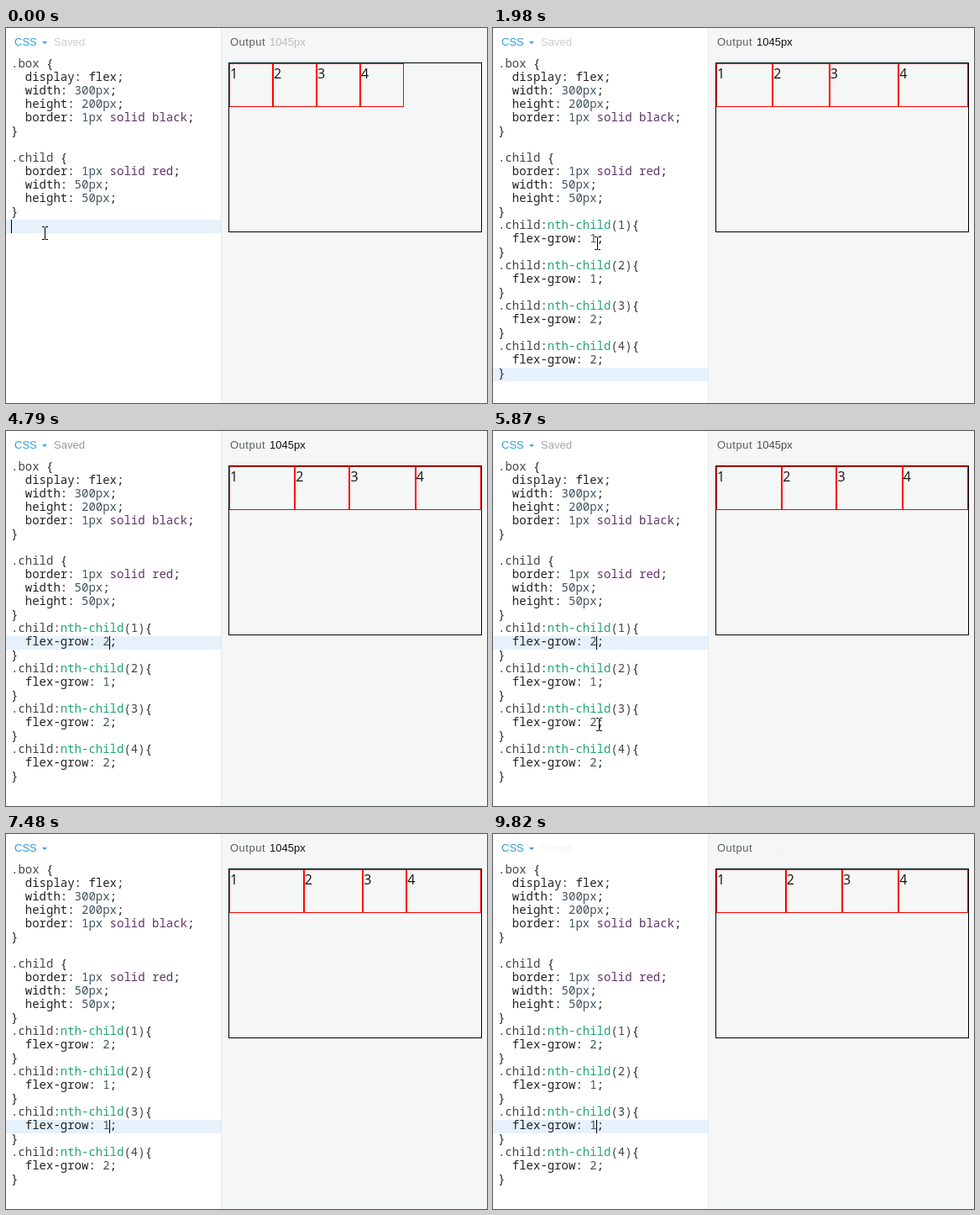
Recreate the animation shown at these times as an HTML page. Size 573 by 446 pixels, loop 9890 ms.

```html
<!DOCTYPE html>
<html lang="en">
<head>
<meta charset="utf-8">
<title>Flex grow demo</title>
<style>
  html, body { margin: 0; width: 100%; height: 100%; overflow: hidden; background: #fff; }
  body { position: relative; font: 13px/16px "Liberation Sans", Arial, sans-serif; }
  body > * { position: absolute; white-space: pre; }
  #output { left: 256px; top: 0; right: 0; bottom: 0; background: #f5f7f6; border-left: 1px solid #e6e9e9; }
  .label { top: 9px; }
  #lang { left: 10px; color: #2f9fd8; }
  #arrow { left: 43px; top: 16px; border: 3px solid transparent; border-top-color: #2f9fd8; }
  #saved { left: 57px; color: #999; }
  #title { left: 267px; letter-spacing: .5px; color: #56605e; }
  #size { left: 314px; color: #111; }
  #active { left: 0; width: 256px; height: 16px; background: #e6f1fc; }
  #code { left: 6px; top: 34px; margin: 0; font: 300 14px/16px "Noto Sans Mono", monospace; color: #222; }
  .selector { color: #444; }
  .pseudo { color: #22a376; }
  .number { color: #40545e; }
  .atom { color: #5f3468; }
  #caret { width: 1px; height: 16px; background: #000; }
  #box { left: 265px; top: 41px; width: 300px; height: 200px; display: flex; border: 1px solid #000; }
  #box div { width: 50px; height: 50px; border: 1px solid #f00; font: 16px/22px "Open Sans", sans-serif; color: #111; }
  svg { left: 0; top: 0; }
</style>
</head>
<body>
<div id="output"></div>
<div class="label" id="lang">CSS</div>
<div id="arrow"></div>
<div class="label" id="saved">Saved</div>
<div class="label" id="title">Output</div>
<div class="label" id="size">1045px</div>
<div id="active"></div>
<pre id="code"></pre>
<div id="caret"></div>
<div id="box"><div>1</div><div>2</div><div>3</div><div>4</div></div>
<svg width="573" height="446">
  <path id="beam" d="M-3.5-7.5h2.5l1 1 1-1h2.5M0-6.5v14M-3.5 7.5h2.5l1-1 1 1h2.5" fill="none" stroke="#000"/>
  <path id="pointer" d="M.5.5v15l3.5-3 2.5 5.5 2-1-2.5-5.5h5z" fill="#fff" stroke="#000"/>
</svg>
<script>
const LOOP = 9890, BLINK = 530;
const LAST_TYPED = -2320, PASTE = 1170;
const CLICK = 960, ERASE = 230;   // how long before typing each happens
const LAG = 220;                  // the output trails the code

const edits = [{ at: 3710, child: 0, value: 2 }, { at: 7330, child: 2, value: 1 }];

// Each visit glides between two points during `move`.
const visits = [
  { cursor: 'beam', from: [46, 244], to: [124, 256], start: 0, move: [1780, 1960], end: 3480 },
  { cursor: 'pointer', from: [221, 440], to: [221, 440], start: 4410, move: [4410, 4600], end: 4600 },
  { cursor: 'beam', from: [196, 438], to: [126, 349], start: 4940, move: [4940, 5640], end: 7400 },
  { cursor: 'pointer', from: [424, 442], to: [478, 446], start: 8180, move: [8500, 8980], end: 8980 }
];

const $ = id => document.getElementById(id);
const children = [...$('box').children];
const ramp = (t, start, end) => Math.min(1, Math.max(0, (t - start) / (end - start)));

const span = (name, text) => `<span class="${name}">${text}</span>`;
const num = v => span('number', v);
const atom = v => span('atom', v);
const rule = (selector, lines) =>
  `${span('selector', selector)}{\n${lines.map(l => `  ${l};\n`).join('')}}\n`;
const border = color => `border: ${num('1px')} ${atom('solid')} ${atom(color)}`;
const base = rule('.box ', ['display: flex', `width: ${num('300px')}`,
    `height: ${num('200px')}`, border('black')]) + '\n' +
  rule('.child ', [border('red'), `width: ${num('50px')}`, `height: ${num('50px')}`]);
const growRule = (v, i) =>
  rule(`.child:${span('pseudo', 'nth-child')}(${i + 1})`, [`flex-grow: ${num(v)}`]);

function editorAt(t) {
  const s = { grow: [], line: 12, column: 0, since: LAST_TYPED, typed: LAST_TYPED, touched: LAST_TYPED };
  if (t >= PASTE) {
    Object.assign(s, { grow: [1, 1, 2, 2], line: 23, column: 1, since: PASTE, typed: PASTE, touched: PASTE });
  }
  for (const { at, child, value } of edits) {
    const click = at - CLICK, erase = at - ERASE;
    if (t >= click) Object.assign(s, { line: 13 + 3 * child, column: 14, since: click });
    if (t >= erase) {
      s.grow[child] = '';
      Object.assign(s, { column: 13, since: erase, typed: at, touched: erase });
    }
    if (t >= at) {
      s.grow[child] = value;
      Object.assign(s, { column: 14, since: at });
    }
  }
  return s;
}

function drawCursor(id, t) {
  const visit = visits.find(v => v.cursor === id && t >= v.start && t < v.end);
  $(id).style.display = visit ? '' : 'none';
  if (!visit) return;
  const p = ramp(t, ...visit.move);
  const [x, y] = visit.from.map((a, i) => Math.round(a + (visit.to[i] - a) * p));
  $(id).setAttribute('transform', `translate(${x + .5} ${y})`);
}

let shownCode;
function draw(now) {
  const t = now % LOOP, editor = editorAt(t);

  const code = base + editor.grow.map(growRule).join('');
  if (code !== shownCode) $('code').innerHTML = shownCode = code;

  const { grow } = editorAt(t - LAG);
  children.forEach((child, i) => child.style.flexGrow = grow[i] || 0);

  $('active').style.top = $('caret').style.top = 36 + 16 * editor.line + 'px';
  $('caret').style.left = Math.floor(6 + 8.4 * editor.column) + 'px';
  $('caret').style.opacity = Math.floor((t - editor.since) / BLINK) % 2 ? 0 : 1;

  const idle = t - editor.typed;
  const remaining = 1 - ramp(idle, 2100, 2540);
  $('saved').style.opacity = ramp(idle, 640, 980) * remaining;
  $('size').style.opacity = t >= editor.touched + LAG ? remaining ** 2 : 0;

  drawCursor('beam', t);
  drawCursor('pointer', t);
  requestAnimationFrame(() => draw(performance.now()));
}
draw(0);
</script>
</body>
</html>
```
